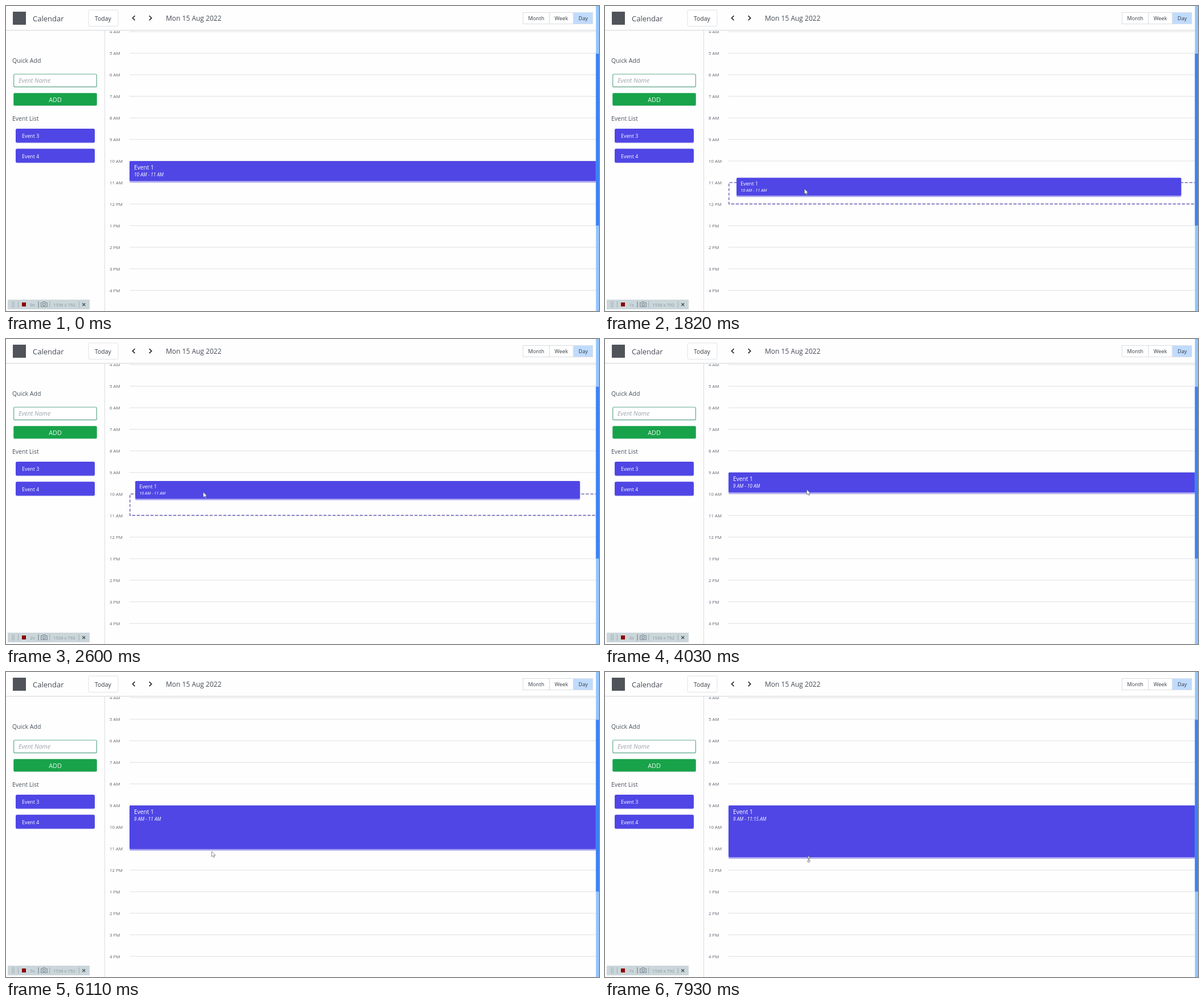
An HTML page that plays this animation: 1042 by 537 pixels, repeating every 8000 ms.

```html
<!DOCTYPE html>
<html lang="en">
<head>
<meta charset="utf-8">
<title>Calendar</title>
<style>
html, body { margin: 0; width: 100%; height: 100%; overflow: hidden; background: #fefefe; }
svg { display: block; width: 1042px; height: 537px; font-family: "Open Sans", "Noto Sans", sans-serif; }
.medium { font-weight: 500; }
.italic { font-style: italic; }
</style>
</head>
<body>
<svg id="stage" viewBox="0 0 1042 537"></svg>
<script>
const HOUR = 37.95, TEN = 272.9, INDIGO = '#4f46e5', LOOP = 8000;

const rect = (x, y, w, h, fill, more = '') =>
  `<rect x="${x}" y="${y}" width="${w}" height="${h}" fill="${fill}" ${more}/>`;
const text = (x, y, size, content, fill = '#40464f', more = '') =>
  `<text x="${x}" y="${y}" font-size="${size}" fill="${fill}" ${more}>${content}</text>`;
const path = (d, stroke, width = 1, more = '') =>
  `<path d="${d}" fill="none" stroke="${stroke}" stroke-width="${width}" ${more}/>`;
const medium = 'class="medium"', italic = 'class="italic"';

const clock = hour => `${(hour + 11) % 12 + 1} ${hour < 12 ? 'AM' : 'PM'}`;

function grid() {
  let out = '';
  for (let hour = 4; hour <= 17; hour++) {
    const y = TEN + (hour - 10) * HOUR;
    out += text(182, y + 3, 7.9, clock(hour), '#5f6670') + rect(217, y - .6, 820, 1.2, '#e1e4e8');
  }
  return out;
}

function header() {
  const tab = (x, w, label, tx, fill = '#fff') =>
    rect(x, 11.5, w, 20, fill, 'stroke="#d9dde2"') + text(tx, 25.4, 9.2, label, '#343a42', medium);
  return rect(0, 0, 1037, 42.5, '#fefefe') + rect(0, 42, 1037, 1.3, '#dcdfe2') +
    rect(0, 43.3, 1037, 1, '#f2f3f4') +
    rect(12, 10, 23, 23, '#50545a') +
    text(47, 26.7, 13, 'Calendar', '#454b55', medium) +
    rect(145, 7, 52, 28.5, '#fff', 'rx="2" stroke="#dfe2e6"') +
    text(156, 25.6, 10.4, 'Today', '#343a42', medium) +
    path('M226.5 17.2l-4 4 4 4M251.7 17.2l4 4-4 4', '#30353c', 1.8) +
    text(281, 26, 12, 'Mon 15 Aug 2022', '#454b55', medium) +
    tab(908.5, 46.5, 'Month', 917.5) + tab(955, 42, 'Week', 964) +
    tab(997, 34, 'Day', 1006, '#bfdbfe');
}

function sidebar() {
  const item = (y, label) =>
    rect(17, y + 1, 139, 24.5, '#c9c6f3', 'rx="2.5"') + rect(17, y, 139, 24.5, INDIGO, 'rx="2.5"') +
    text(28, y + 16.3, 8.9, label, '#fff', medium);
  return rect(173, 43, 1, 494, '#d9dcdf') +
    text(11, 99.5, 10.6, 'Quick Add', '#4b525c', medium) +
    rect(13.5, 121, 146, 22.5, '#dfe5e3', 'rx="2"') +
    rect(13.7, 120, 145.6, 22.4, '#fff', 'rx="2" stroke="#61ab8d" stroke-width="1.2"') +
    text(22, 135, 10.7, 'Event Name', '#9aa2aa', italic) +
    rect(13.3, 154, 146.4, 22.3, '#cbe3d5', 'rx="2"') +
    rect(13.3, 153.2, 146.4, 22, '#18a34a', 'rx="2"') +
    text(75.2, 168.8, 10.9, 'ADD', '#e8f7ed') +
    text(11, 201.6, 10.5, 'Event List', '#4b525c', medium) +
    item(216, 'Event 3') + item(251.2, 'Event 4');
}

function recorder() {
  let dots = '';
  for (let i = 0; i < 8; i++)
    dots += rect(10.5 + i % 2 * 3, 520.5 + (i >> 1) * 2.8, 1.3, 1.3, '#7f93a0');
  return rect(3, 517, 144, 17, '#cbd6da') + dots +
    path('M21.5 520v11M76.8 520v11M128.3 520v11', '#a0adb4') +
    path('M57 520v11', '#77858e', 1.2) +
    rect(28, 522, 7, 7, '#8b0000') +
    text(42.5, 528.7, 7.7, '<tspan id="seconds"></tspan>s', '#89959c') +
    path('M61.7 522.5h2.3l1-1.7h4l1 1.7h2.3v7h-10.6z', '#7f8d98', 1.2) +
    '<circle cx="67" cy="525.7" r="2.2" fill="none" stroke="#7f8d98" stroke-width="1.2"/>' +
    text(83, 528.7, 7.7, '1536 x 792', '#89959c') +
    path('M134.3 523.2l4.8 4.8m0-4.8l-4.8 4.8', '#46555f', 1.4);
}

const stage = document.getElementById('stage');
stage.innerHTML = rect(0, 0, 1042, 537, '#fefefe') + grid() +
  `<g id="slot">${path(`M1040 0H217.8V${HOUR - .3}H1040`, '#625bb8', 1.4, 'stroke-dasharray="5 3"')}</g>` +
  `<g id="event">${rect(0, 0, 878, 0, '#aaa6f1', 'id="edge" rx="2"')}` +
  `${rect(0, 0, 878, 0, INDIGO, 'id="body" rx="2"')}` +
  text(8, 15, 10.2, 'Event 1', '#fff') +
  text(8, 27.3, 8.2, '', '#fff', 'id="span" class="italic medium"') + '</g>' +
  header() + sidebar() +
  rect(1036.6, 0, 5.4, 537, '#93c5fd') + rect(1036.6, 84, 5.4, 302.5, '#3b82f6') + recorder() +
  '<g id="cursor" fill="#fff" stroke="#555a66" stroke-width=".7">' +
  '<path id="arrow" d="M0 0V9.2L2.2 7.3 3.6 10.4 5 9.8 3.7 6.8H6.6Z"/>' +
  '<path id="resize" d="M0-5.8L2.6-2.8H.7V2.8H2.6L0 5.8-2.6 2.8H-.7V-2.8H-2.6Z"/></g>';

const part = {};
stage.querySelectorAll('[id]').forEach(el => part[el.id] = el);
const set = (id, attrs) => { for (const key in attrs) part[id].setAttribute(key, attrs[key]); };
const show = (id, on) => set(id, { visibility: on ? 'visible' : 'hidden' });

const refreshes = [[0, 0], [390, 1040], [1300, 1430], [1820, 2730], [3120, 3120],
  [4030, 4290], [4940, 5200], [5720, 6630], [7150, 7930]];
function refreshTime(t) {
  const [start, end] = refreshes.filter(r => r[0] <= t).pop();
  return Math.min(end, start + Math.floor((t - start) / 130) * 130);
}

// Keys are [time, value, ...], interpolated linearly.
function along(keys, t) {
  const next = keys.findIndex(k => k[0] > t);
  if (next < 0) return keys[keys.length - 1].slice(1);
  if (next === 0) return keys[0].slice(1);
  const a = keys[next - 1], b = keys[next], p = (t - a[0]) / (b[0] - a[0]);
  return a.slice(1).map((v, i) => v + (b[i + 1] - v) * p);
}
const pointer = [[390, 430, 400], [1040, 352, 293], [1300, 352, 295], [1430, 351, 305],
  [1820, 350.5, 322], [2600, 346.5, 269.5], [2730, 347, 258], [3120, 350, 260],
  [4030, 354.5, 265], [4290, 358, 272], [4940, 358, 283], [5200, 358, 313],
  [5720, 359, 314], [6110, 361.5, 316], [6630, 358, 316], [7150, 358, 317],
  [7280, 358, 322], [7930, 358, 330]];
const bottom = [[4290, 272.7], [4940, 284], [5200, 314.5], [6630, 314.5],
  [7150, 316], [7280, 321.5], [7930, 328.7]];

function draw(now) {
  const t = refreshTime(now % LOOP);
  const [x, y] = along(pointer, t);
  const dragging = t >= 1300 && t < 3120, dropped = t >= 3120;
  const resizing = (t >= 4290 && t < 5720) || t >= 6630;

  show('cursor', t >= 390);
  show('arrow', t >= 390 && !resizing);
  show('resize', resizing);
  set('cursor', { transform: `translate(${x} ${y})` });

  const row = Math.floor((y + 4 - TEN) / HOUR);
  show('slot', dragging);
  set('slot', { transform: `translate(0 ${TEN + row * HOUR})` });

  const top = dropped ? TEN - HOUR : TEN;
  const height = dropped ? along(bottom, t)[0] - top : 37.8;
  set('event', { transform: dragging
    ? `translate(${x - 119.4} ${y - 19.4}) scale(.89)` : `translate(217 ${top})` });
  set('edge', { height, width: 878 });
  set('body', { height: height - 2.8 });

  const quarters = dropped ? Math.floor((height - HOUR + .5) / HOUR * 4) : 4;
  const minutes = quarters % 4 * 15;
  const end = clock(10 + Math.floor(quarters / 4)).replace(' ', minutes ? `:${minutes} ` : ' ');
  part.span.textContent = dropped
    ? `9 AM - ${end}` : '10 AM - 11 AM';
  part.seconds.textContent = Math.max(0, Math.floor((t - 115) / 1000));
}

const began = performance.now();
function tick() {
  draw(performance.now() - began);
  requestAnimationFrame(tick);
}
tick();
</script>
</body>
</html>
```
